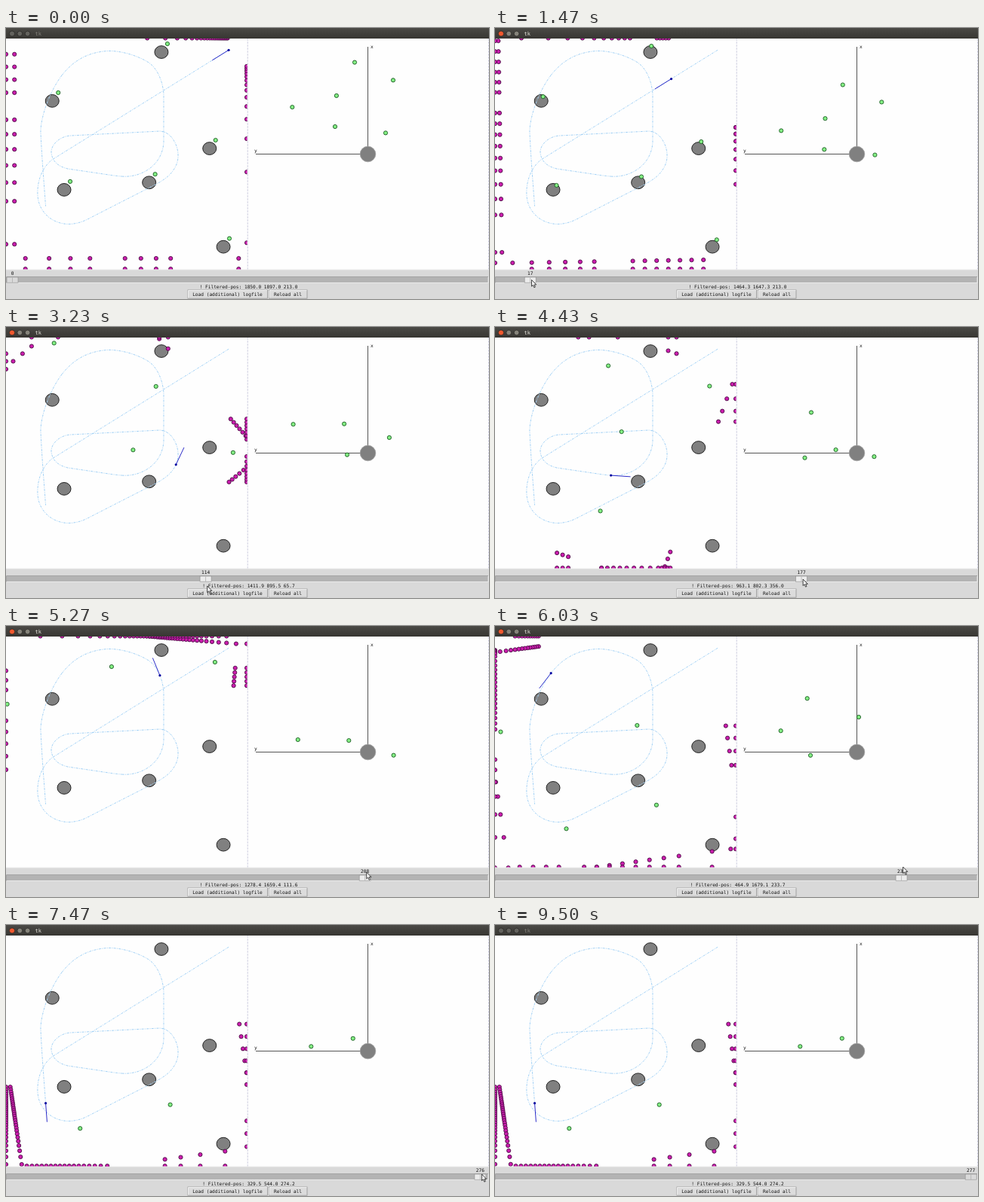
Recreate the animation shown at these times as an HTML page. Size 640 by 360 pixels, loop 9.53 s.

```html
<!DOCTYPE html>
<html lang="en">
<head>
<meta charset="utf-8">
<title>Pose viewer</title>
<style>
  html, body { margin: 0; width: 100%; height: 100%; overflow: hidden; background: #d9d9d9; }
  svg { display: block; width: 100vw; height: 100vh; }
  text { font: 6.17px "DejaVu Sans Mono", monospace; fill: #111; }
  .mid { text-anchor: middle; }
  .seen { fill: #84f084; stroke: #1c5a24; stroke-width: .9; }
</style>
</head>
<body>
<svg viewBox="0 0 640 360">
  <defs>
    <linearGradient id="bar" x2="0" y2="1">
      <stop offset="0" stop-color="#4b4a46"/>
      <stop offset="1" stop-color="#373632"/>
    </linearGradient>
    <clipPath id="map"><rect y="14" width="319.5" height="306.5"/></clipPath>
  </defs>
  <rect width="640" height="360" fill="#d9d9d9"/>
  <rect y="14" width="640" height="307" fill="#fefefe"/>
  <path d="M320.2 14V321M639.5 14V321" stroke="#cfcfe0" stroke-dasharray="3 1"/>
  <path d="M0 321H640" stroke="#ececec"/>

  <g clip-path="url(#map)">
    <g id="posts" fill="#808080" stroke="#222"></g>
    <g transform="matrix(.1595 0 0 -.1533 0 320.1)" fill="none">
      <g id="trail" stroke="#a4d2f6" stroke-dasharray="3 1.3 1 1.3"></g>
      <use href="#trail" id="tint"/>
    </g>
    <g id="laser" fill="#cc1cae" stroke="#4a1044" stroke-width=".9"></g>
    <g id="seen" class="seen"></g>
    <line id="ray" stroke="#2c2cc8"/>
    <circle id="bot" r="1.6" fill="#0808a0"/>
  </g>

  <path d="M479.5 25V158M331 167.5H470" stroke="#555"/>
  <circle cx="479.5" cy="167.5" r="10.3" fill="#808080" stroke="#a0a0a0" stroke-width=".8"/>
  <text x="483" y="27">x</text>
  <text x="329" y="165">y</text>
  <g id="local" class="seen"></g>

  <rect width="640" height="14" fill="url(#bar)"/>
  <g stroke="#2a2926" stroke-width=".8">
    <circle id="close" cx="8" cy="7.5" r="3.6"/>
    <g id="knobs"><circle cx="18.3" cy="7.5" r="3.4"/><circle cx="28.6" cy="7.5" r="3.4"/></g>
  </g>
  <text id="title" x="38.5" y="10" style="font-size:7px">tk</text>

  <rect x=".5" y="330.5" width="638.5" height="8" fill="#b3b3b3" stroke="#f2f2f2" stroke-width=".8"/>
  <path d="M.5 338.5V330.5H639" fill="none" stroke="#949494" stroke-width=".8"/>
  <g id="thumb">
    <rect id="grip" y="331" width="15" height="7.2" stroke="#8c8c8c" stroke-width=".6"/>
    <path d="M7.5 331.5V338" stroke="#b0b0b0" stroke-width=".8"/>
    <text id="step" class="mid" x="7.5" y="328.3"></text>
  </g>
  <text id="pose" class="mid" x="321.5" y="345.6"></text>
  <g fill="#dcdcdc" stroke="#949494" stroke-width=".8">
    <rect x="241" y="348" width="105.5" height="11.2"/><rect x="348.5" y="348" width="50.5" height="11.2"/>
  </g>
  <path d="M241.5 358.6V348.6H346M349 358.6V348.6H398.5" fill="none" stroke="#fafafa" stroke-width=".8"/>
  <text class="mid" x="293.5" y="356">Load (additional) logfile</text>
  <text class="mid" x="373.5" y="356">Reload all</text>
  <path id="mouse" d="M0 0V8.6L2 6.9L3.4 10.2L4.9 9.5L3.5 6.4H6.2Z" fill="#f4f4f4" stroke="#1a1a1a" stroke-width=".8"/>
</svg>
<script>
const LOOP = 9530;
const SX = .1595, SY = .1533, Y0 = 320.1;   // map pixels per mm
const LX = .0729, LY = .0707;               // robot view pixels per mm
const ARENA = 2000, INSET = 20;             // mm
const BEAMS = 66, BEAM_STEP = .0614, MOUNT = -.063;
const POST_FOV = 1.84, POST_R = 56;
const WALL_EPS = 150;                       // a hit this near a wall is paired with it
const RAD = Math.PI / 180;
const NS = "http://www.w3.org/2000/svg";

const $ = id => document.getElementById(id);
const mix = (a, b, f) => a + (b - a) * f;
const set = (el, attrs) => { for (const k in attrs) el.setAttribute(k, attrs[k]); };
const toMap = ([x, y]) => [x * SX, Y0 - y * SY];
const turn = ([x, y], a) => [x * Math.cos(a) - y * Math.sin(a), x * Math.sin(a) + y * Math.cos(a)];
const dots = list => list.map(([x, y]) =>
  `<circle cx="${x.toFixed(1)}" cy="${y.toFixed(1)}" r="2.6"/>`).join("");

// Filtered route in mm, one piece between each pair of stops
const STOPS = [0, 59, 114, 177, 236, 276];
const ROUTE = [
  "M1850 1897L511.5 1030.4",
  "M511.5 1030.4L376 942C301 875 257 764 263 640C270 490 389 386 527 389C596 392 646 412 702 444L1254 738C1317 777 1374 812.4 1411.9 895.5",
  "M1411.9 895.5C1444 966 1430 1057 1392 1116C1367 1162 1323 1194 1273 1194L533 1155C451 1149 376 1083 376 1012C382 933 433 888 514 868L878 812Q928 804.88 963.1 802.3",
  "M963.1 802.3C1129 790 1298 901 1310 1096L1310 1514C1304 1618 1260 1749 1166 1801C1078 1853 953 1892 846 1889C677 1879 555 1801 464.9 1679.1",
  "M464.9 1679.1C363 1540 288 1318 288 1188C295 1012 314.7 751 329.5 544"
].map(d => {
  const p = document.createElementNS(NS, "path");
  set(p, { d, "vector-effect": "non-scaling-stroke" });
  $("trail").append(p);
  return p;
});

const POSTS = [[1291, 1879], [384, 1456], [1691, 1044], [1189, 749], [483, 686], [1806, 192]];
$("posts").innerHTML = POSTS.map(toMap).map(([x, y]) =>
  `<ellipse cx="${x}" cy="${y}" rx="9" ry="8.4"/>`).join("");

// Filter error: step, rotation about the arena centre (deg), shift in mm
const DRIFT = [[0, 0, 50, 72], [59, 3.3, -44, -13], [114, 40.5, -251, 91], [177, 70.5, -248, 86], [236, 98, -42, 5], [277, 98, -18, -1]];
// Dragging: time, slider step, pointer height
const DRAG = [[0, 0, 366], [400, 0, 366], [950, 0, 334], [1150, 0, 334], [2270, 59, 336], [3230, 114, 344], [4430, 177, 335],
  [6030, 236, 320], [7470, 276, 331], [7600, 277, 331], [7900, 277, 331], [8500, 277, 366], [LOOP, 277, 366]];

function track(keys, at) {
  let i = 0;
  while (i < keys.length - 2 && at >= keys[i + 1][0]) i++;
  const [a, b] = [keys[i], keys[i + 1]];
  const f = (at - a[0]) / (b[0] - a[0]);
  return a.slice(1).map((v, k) => mix(v, b[k + 1], f));
}

function routePoint(n) {
  const m = Math.min(Math.max(n, 0), 276);
  let k = 0;
  while (k < ROUTE.length - 1 && m >= STOPS[k + 1]) k++;
  const f = (m - STOPS[k]) / (STOPS[k + 1] - STOPS[k]);
  const p = ROUTE[k].getPointAtLength(ROUTE[k].getTotalLength() * f);
  return [p.x, p.y];
}

function poseAt(n) {
  const m = Math.min(n, 276);
  const [x, y] = routePoint(m), [ax, ay] = routePoint(m - .2), [bx, by] = routePoint(m + .2);
  const rad = Math.atan2(by - ay, bx - ax);
  return { x, y, rad, deg: (rad / RAD + 360.06) % 360 };
}

// Maps between the real arena and the drifted drawing of it
function drift(n) {
  const [deg, sx, sy] = track(DRIFT, n), a = deg * RAD, c = ARENA / 2;
  return {
    angle: a,
    draw([x, y]) { const [u, v] = turn([x - c, y - c], a); return [u + c + sx, v + c + sy]; },
    real([x, y]) { const [u, v] = turn([x - c - sx, y - c - sy], -a); return [u + c, v + c]; }
  };
}

// Wall point hit by a beam, or null when a post is in the way
function castBeam([x, y], a) {
  const dx = Math.cos(a), dy = Math.sin(a);
  const reach = (p, d) => ((d > 0 ? ARENA - INSET : INSET) - p) / d;
  const dist = Math.min(reach(x, dx), reach(y, dy));
  const blocked = POSTS.some(([px, py]) => {
    const along = (px - x) * dx + (py - y) * dy;
    const off = Math.abs((px - x) * dy - (py - y) * dx);
    return along > 0 && along < dist && off < POST_R;
  });
  return blocked ? null : [x + dx * dist, y + dy * dist];
}

function onWall([x, y]) {
  for (const w of [0, ARENA]) {
    if (Math.abs(x - w) < WALL_EPS) return [w, y];
    if (Math.abs(y - w) < WALL_EPS) return [x, w];
  }
  return null;
}

function scan(pose, error) {
  const eye = error.real([pose.x, pose.y]), heading = pose.rad - error.angle;
  const hits = [];
  for (let i = 0; i < BEAMS; i++) {
    const hit = castBeam(eye, heading + MOUNT + (i - BEAMS / 2) * BEAM_STEP);
    const drawn = hit && error.draw(hit);
    const wall = drawn && onWall(drawn);
    if (wall) hits.push(drawn, wall);
  }
  const posts = POSTS.filter(([x, y]) => {
    const a = Math.atan2(y - eye[1], x - eye[0]) - heading;
    return Math.cos(a) > Math.cos(POST_FOV);
  }).map(error.draw);
  return { hits, posts };
}

function toLocal([x, y], pose) {
  const [ahead, left] = turn([x - pose.x, y - pose.y], -pose.rad);
  return [479.5 - left * LX, 167.5 - ahead * LY];
}

const thumbX = n => 1 + n * 2.246;

let shown = -1;
function drawStep(n) {
  if (n === shown) return;
  shown = n;
  const pose = poseAt(n), { hits, posts } = scan(pose, drift(n));
  const [x, y] = toMap([pose.x, pose.y]);
  set($("bot"), { cx: x, cy: y });
  set($("ray"), { x1: x, y1: y, x2: x + 26 * Math.cos(pose.rad), y2: y - 25 * Math.sin(pose.rad) });
  $("laser").innerHTML = dots(hits.map(toMap));
  $("seen").innerHTML = dots(posts.map(toMap));
  $("local").innerHTML = dots(posts.map(p => toLocal(p, pose)));
  $("pose").textContent = "! Filtered-pos: " + [pose.x, pose.y, pose.deg].map(v => v.toFixed(1)).join(" ");
  $("step").textContent = n;
  set($("thumb"), { transform: `translate(${thumbX(n)})` });
}

function render(t) {
  const [n, my] = track(DRAG, t);
  drawStep(Math.round(n));
  set($("mouse"), { transform: `translate(${thumbX(n) + 9.5} ${my})` });
  const focus = t > 700 && t < 8900;
  set($("close"), { fill: focus ? "#f0592f" : "#63625d" });
  set($("knobs"), { fill: focus ? "#85837a" : "#63625d" });
  $("title").style.fill = focus ? "#e8e6de" : "#85837c";
  set($("grip"), { fill: t > 950 && t < 8100 ? "#ececec" : "#d9d9d9" });
}

$("tint").remove();
const start = performance.now();
function tick() {
  render((performance.now() - start) % LOOP);
  requestAnimationFrame(tick);
}
tick();
</script>
</body>
</html>
```
